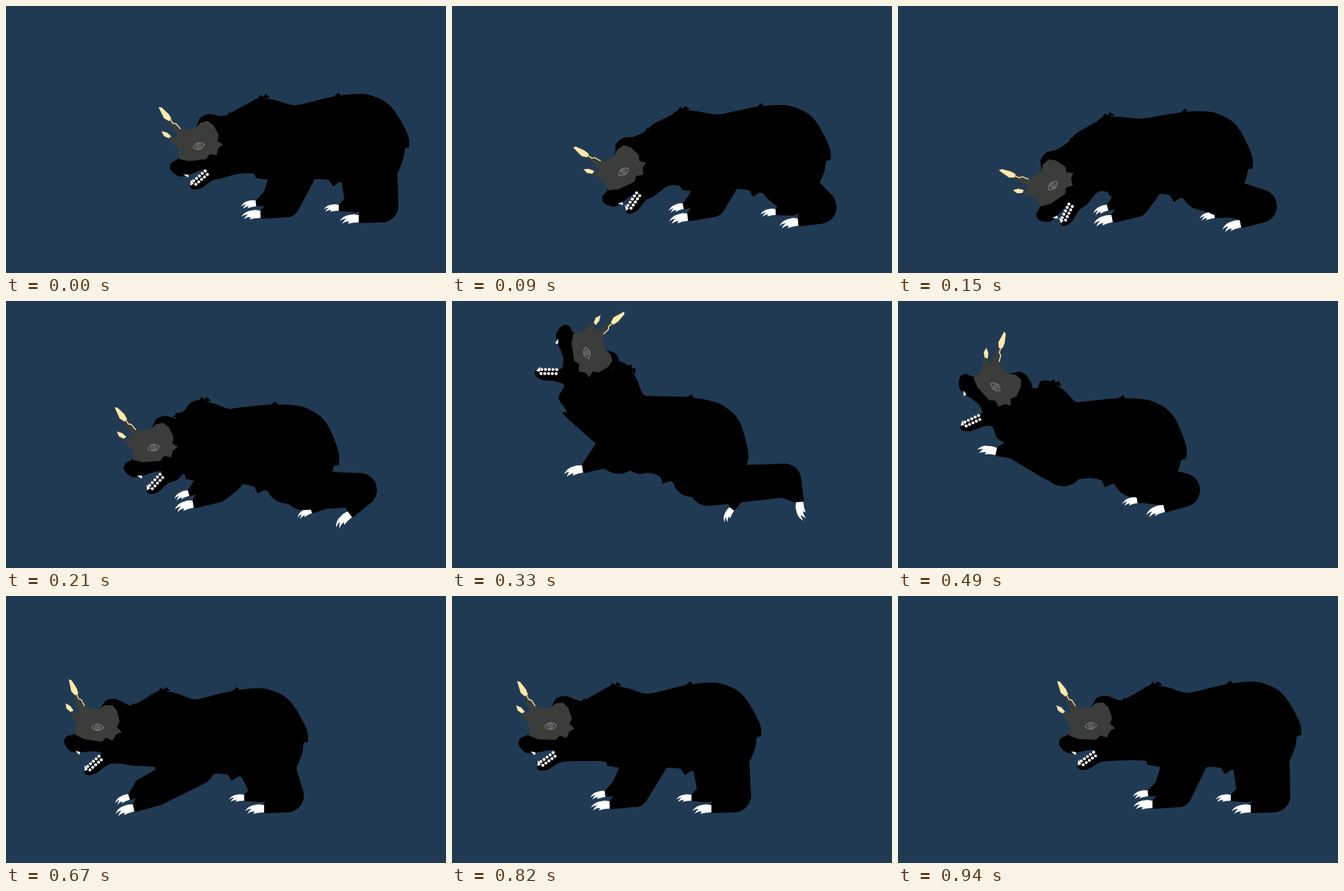
These frames come from a looping animation (600 px wide and 364 px high, 970 ms). An HTML page with a canvas:

```html
<!DOCTYPE html>
<html lang="en">
<head>
<meta charset="utf-8">
<title>Leaping bear</title>
<style>
  html, body { margin: 0; width: 100%; height: 100%; overflow: hidden; background: #213a53; }
  canvas { display: block; }
</style>
</head>
<body>
<canvas id="stage" width="600" height="364"></canvas>
<script>
const ctx = document.getElementById('stage').getContext('2d');
const LOOP = 970, RESET = 940, STRIDE = 127, RAD = Math.PI / 180;
const MASK = '#3b3d3a', HORN = '#ffe9a9', WHITE = '#fff', EYE = '#777a77';

// Stand, crouch, leap, fall, land, stand. Each part is x, y, degrees; gape opens the jaw.
const poses = [
  { t: 0, pelvis: [452,119,0], chest: [350,122,0], head: [263,191,-9], gape: [-4], front: [346,284,0], hind: [480,290,0] },
  { t: 150, pelvis: [391,141,4], chest: [285,147,-7], head: [211,245,-37], gape: [-9], front: [291,290,-10], hind: [466,297,-12] },
  { t: 330, pelvis: [326,128,15], chest: [246,90,50], head: [184,71,79], gape: [43], front: [177,229,-10], hind: [474,275,-95] },
  { t: 490, pelvis: [306,129,8], chest: [215,109,28], head: [133,117,46], gape: [36], front: [133,205,12], hind: [362,283,-14] },
  { t: 670, pelvis: [314,125,0], chest: [214,126,0], head: [125,179,6], gape: [12], front: [173,289,-12], hind: [351,290,0] },
  { t: 870, pelvis: [325,116,0], chest: [223,118,0], head: [136,177,0], gape: [0], front: [219,284,0], hind: [353,290,0] }
];
const last = poses.length - 1;

const slope = (part, i, c) =>
  (poses[i + 1][part][c] - poses[i][part][c]) / (poses[i + 1].t - poses[i].t);

// Monotone tangent: flat at turning points and at both ends.
function tangent(part, i, c) {
  if (i === 0 || i === last) return 0;
  const a = slope(part, i - 1, c), b = slope(part, i, c);
  return a * b > 0 ? 2 * a * b / (a + b) : 0;
}

function sample(part, t) {
  let i = 0;
  while (i < last - 1 && t >= poses[i + 1].t) i++;
  const a = poses[i], b = poses[i + 1], d = b.t - a.t;
  const u = Math.min(1, (t - a.t) / d), v = 1 - u;
  return a[part].map((from, c) =>
    v * v * (1 + 2 * u) * from + u * u * (3 - 2 * u) * b[part][c] +
    d * u * v * (v * tangent(part, i, c) - u * tangent(part, i + 1, c)));
}

function turn(x, y, deg) {
  const cos = Math.cos(deg * RAD), sin = Math.sin(deg * RAD);
  return [x * cos - y * sin, x * sin + y * cos];
}

// Bone anchors in the standing pose, in which all shapes below are drawn.
const rest = { P: [452,116], C: [350,118], H: [263,177], J: [283,204] };
let bones;

function setBones(t) {
  const head = sample('head', t);
  bones = { P: sample('pelvis', t), C: sample('chest', t), H: head };
  bones.J = [...bend('H', ...rest.J), head[2] - sample('gape', t)[0]];
}

// Moves a point with the mean of the named bones.
function bend(names, x, y) {
  let sx = 0, sy = 0;
  for (const n of names) {
    const [dx, dy] = turn(x - rest[n][0], y - rest[n][1], bones[n][2]);
    sx += bones[n][0] + dx;
    sy += bones[n][1] + dy;
  }
  return [sx / names.length, sy / names.length];
}

function points(names, list) {
  const out = [];
  for (let i = 0; i < list.length; i += 2) out.push(bend(names, list[i], list[i + 1]));
  return out;
}

const body = [
  ['H', [222,194, 234,187, 242,160, 262,152, 271,139, 284,136, 298,141]],
  ['CH', [306,142, 318,136]],
  ['C', [332,128, 344,122, 366,124]],
  ['CP', [388,131]],
  ['P', [402,131, 444,121, 475,117, 498,119, 524,133, 546,168, 550,188, 544,192, 541,208,
         528,232, 500,240, 463,238, 428,233, 395,236]],
  ['C', [345,231, 339,225]],
  ['HC', [316,224]],
  ['J', [288,225, 275,227, 259,236, 247,236, 246,228, 267,212]],
  ['HJ', [272,211]],
  ['H', [262,210, 240,214, 229,213, 220,203]]
];
const tufts = [
  ['CH', [302,146, 309,138, 312,144]],
  ['C', [342,124, 347,117, 351,120, 354,116, 360,121]],
  ['P', [444,123, 453,115, 458,121]],
  ['P', [440,234, 446,243, 456,236]],
  ['C', [338,224, 341,231, 345,229, 358,236]]
];
const mask = [226,134, 232,135, 240,147, 246,152, 262,152, 270,146, 280,145, 287,152, 292,166, 289,174,
  296,180, 289,184, 285,193, 276,190, 270,196, 246,195, 233,190, 235,178, 224,161, 236,159];
const bigHorn = [217,116, 221,117, 229,127, 232,134, 228,137, 222,132];
const smallHorn = [216,149, 223,152, 228,158, 224,160, 218,156];
const crack = [230,135, 233,141, 237,142, 242,150];

function polygon(names, list, color) {
  ctx.beginPath();
  points(names, list).forEach(p => ctx.lineTo(...p));
  ctx.fillStyle = color;
  ctx.fill();
}

// Closed smooth curve through all points.
function blob(pts) {
  const at = i => pts[(i + pts.length) % pts.length];
  ctx.beginPath();
  ctx.moveTo(...pts[0]);
  pts.forEach((p, i) => {
    const a = at(i - 1), q = at(i + 1), b = at(i + 2);
    ctx.bezierCurveTo(p[0] + (q[0] - a[0]) / 6, p[1] + (q[1] - a[1]) / 6,
      q[0] - (b[0] - p[0]) / 6, q[1] - (b[1] - p[1]) / 6, ...q);
  });
  ctx.fill();
}

function taper([x1, y1, r1], [x2, y2, r2]) {
  const a = Math.atan2(y2 - y1, x2 - x1);
  const ratio = (r1 - r2) / (Math.hypot(x2 - x1, y2 - y1) || 1);
  const b = Math.acos(Math.max(-1, Math.min(1, ratio)));
  ctx.beginPath();
  ctx.arc(x1, y1, r1, a + b, a - b + 2 * Math.PI);
  ctx.arc(x2, y2, r2, a - b, a + b);
  ctx.fill();
}

const clawPath = new Path2D(
  'M1-5L-6-6L-13-5Q-20-4-25 3Q-20 0-16 0Q-20 3-22 7Q-16 3-12 4L-14 7Q-7 5 1 5Z');

function local([x, y, r], paint) {
  ctx.save();
  ctx.translate(x, y);
  ctx.rotate(r * RAD);
  paint();
  ctx.restore();
}

// The heel is fixed to the paw, so the lower leg turns with it.
function leg(names, hip, heel, paw, size) {
  const [x, y, r] = paw, [hx, hy] = turn(heel[0], heel[1], r), [px, py] = turn(4, 0, r);
  const joint = [x + hx, y + hy, heel[2]];
  ctx.fillStyle = '#000';
  taper([...bend(names, hip[0], hip[1]), hip[2]], joint);
  taper(joint, [x + px, y + py, 6 * size]);
  local(paw, () => {
    ctx.scale(size, size);
    ctx.fillStyle = WHITE;
    ctx.fill(clawPath);
  });
}

// Far paws follow the near ones: the front one tucks in when lifted, the hind one trails.
function farFront([x, y, r]) {
  const k = Math.max(0, Math.min(1, (y - 230) / 40));
  return [x - 6 * k, y - 15 * k, r - 6 * k];
}
function farHind([x, y, r]) {
  const lift = -r / 95;
  return [x - 27 - 66 * lift, y - 15 + 24 * lift, r * 0.58];
}

function teeth() {
  ctx.fillStyle = WHITE;
  for (const y of [225, 230]) {
    for (let i = 0; i < 5; i++) {
      const [px, py] = bend('J', 250 + (y - 225) * 0.5 + i * 4.2, y - i * 3);
      ctx.beginPath();
      ctx.arc(px, py, 2.1, 0, 2 * Math.PI);
      ctx.fill();
    }
  }
  polygon('J', [245,231, 246,223, 250,229], WHITE);
  polygon('H', [236,212, 243,213, 242,217], WHITE);
}

function eye() {
  ctx.rotate(-6 * RAD);
  ctx.strokeStyle = EYE;
  ctx.lineWidth = 1.2;
  ctx.beginPath();
  ctx.moveTo(-8, 0);
  ctx.quadraticCurveTo(0, -9, 8, 0);
  ctx.quadraticCurveTo(0, 9, -8, 0);
  for (const r of [3, 0.7]) {
    ctx.moveTo(r, 0);
    ctx.arc(0, 0, r, 0, 2 * Math.PI);
  }
  ctx.stroke();
}

function draw(t) {
  ctx.fillStyle = '#213a53';
  ctx.fillRect(0, 0, 600, 364);
  ctx.save();
  if (t >= RESET) ctx.translate(STRIDE, 0);
  setBones(t);
  const front = sample('front', t), hind = sample('hind', t);

  leg('PPC', [378,228,18], [23,-7,12], farFront(front), 0.8);
  leg('P', [482,225,26], [23,-8,14], farHind(hind), 0.8);
  ctx.fillStyle = '#000';
  blob(body.flatMap(([names, list]) => points(names, list)));
  tufts.forEach(([names, list]) => polygon(names, list, '#000'));
  leg('PPC', [395,222,28], [36,-15,19], front, 1);
  leg('P', [507,230,27], [32,-18,23], hind, 1);

  teeth();
  polygon('H', mask, MASK);
  polygon('H', bigHorn, HORN);
  polygon('H', smallHorn, HORN);
  ctx.beginPath();
  points('H', crack).forEach(p => ctx.lineTo(...p));
  ctx.strokeStyle = HORN;
  ctx.lineWidth = 1.3;
  ctx.stroke();
  local(bones.H, eye);
  ctx.restore();
}

// Steps of 30 ms, one of them 40 ms, with a short rest after landing.
function step(t) {
  const s = t < 490 ? Math.min(450, Math.floor(t / 30) * 30) : Math.floor((t - 10) / 30) * 30 + 10;
  return s >= 550 && s < 610 ? 580 : s;
}

function tick() {
  draw(step(performance.now() % LOOP));
  requestAnimationFrame(tick);
}
tick();
</script>
</body>
</html>
```
